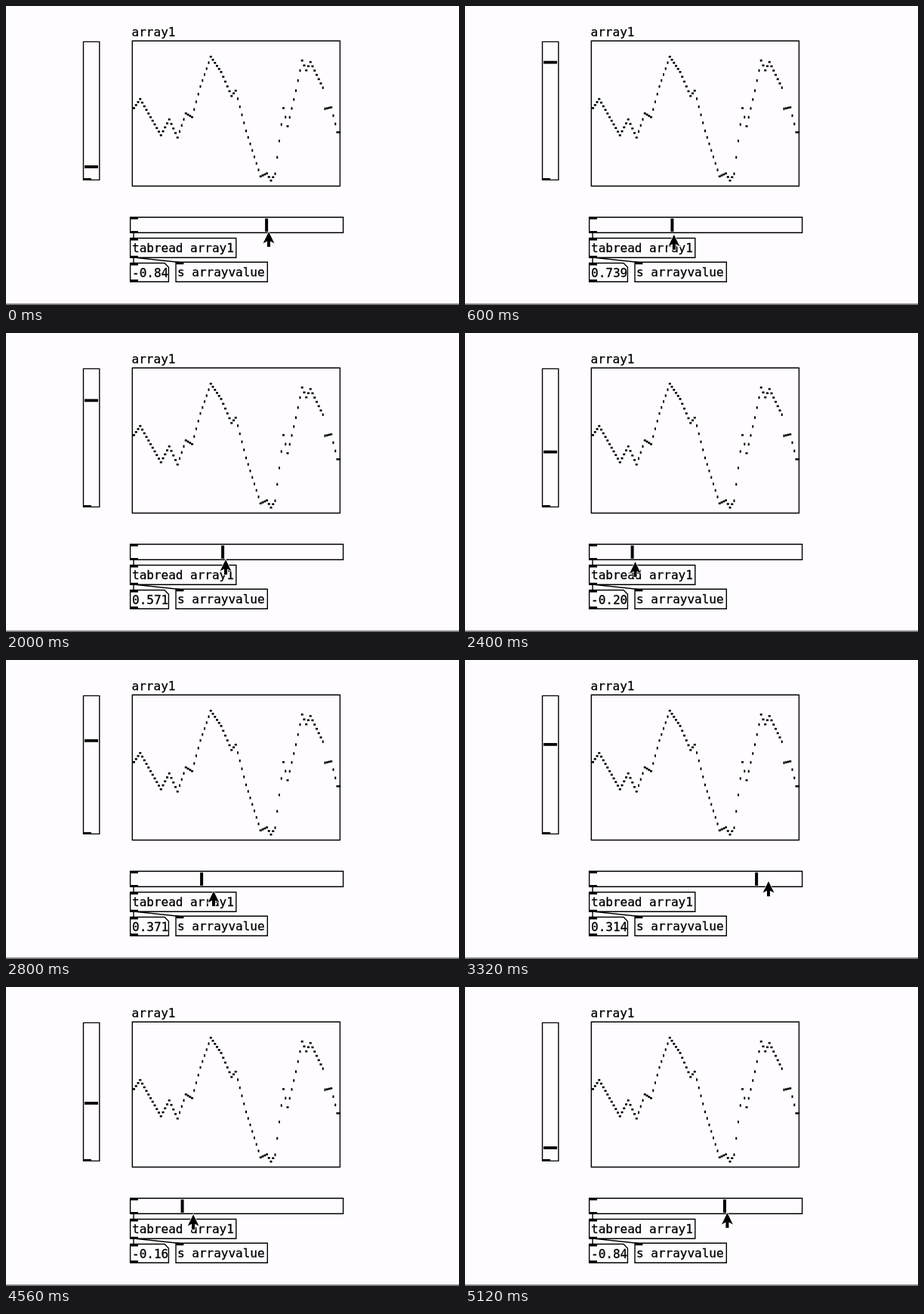
Animation, 600 px wide and 396 px high, one loop 5.16 s. Source, as an HTML page with a canvas:

```html
<!DOCTYPE html>
<html lang="en">
<head>
<meta charset="utf-8">
<title>array1</title>
<style>
  html, body { margin: 0; width: 100%; height: 100%; overflow: hidden; background: #fefcff; }
  canvas { display: block; }
</style>
</head>
<body>
<canvas id="stage" width="600" height="396"></canvas>
<script>
const ctx = document.getElementById("stage").getContext("2d");
const LOOP = 5160;
const TICK = 40;
const SIZE = 100;
const INK = "#000";
const PAPER = "#fefcff";

// Corners of the stored wave: sample index, stage y.
const corners = [
  [0, 135], [3, 123], [13, 171], [17, 150], [21, 174], [25, 142], [28, 147],
  [32, 106.4], [37, 67], [42, 87.2], [47, 119], [49, 112], [54, 165.2],
  [61, 225.5], [64, 221.5], [66, 231], [68, 222], [72, 135], [74, 159],
  [78, 111.9], [81, 72], [83, 85], [85, 74], [91, 108], [92, 136], [95, 134],
  [98, 167], [99, 167]
];

// Gesture: time, pointer x, pointer tip y, slider x
const gesture = [
  [0, 348, 299, 345],
  [680, 274, 303, 271.5],
  [840, 274, 303, 271.5],
  [1280, 332, 307, 320.2],
  [1480, 343, 303, 339],
  [2000, 291, 300, 287],
  [2500, 220, 304, 216],
  [2800, 275, 306, 259],
  [3320, 402, 293, 386],
  [3620, 437, 292, 433],
  [4040, 307.4, 293.5, 338],
  [4400, 215, 300, 212],
  [4760, 308, 302, 280]
];

function sampleY(i) {
  const k = Math.max(1, corners.findIndex(([index]) => index >= i));
  const [i0, y0] = corners[k - 1];
  const [i1, y1] = corners[k];
  return y0 + (y1 - y0) * (i - i0) / (i1 - i0);
}

const samples = Array.from({ length: SIZE }, (_, i) => sampleY(i));

function keyAt(i) {
  const n = gesture.length;
  const turn = Math.floor(i / n);
  const [time, ...rest] = gesture[i - turn * n];
  return [time + turn * LOOP, ...rest];
}

function slope(i, col) {
  const [a, b, c] = [keyAt(i - 1), keyAt(i), keyAt(i + 1)];
  const before = (b[col] - a[col]) / (b[0] - a[0]);
  const after = (c[col] - b[col]) / (c[0] - b[0]);
  return before * after > 0 ? 2 * before * after / (before + after) : 0;
}

// Smooth periodic curve that never overshoots its keys.
function track(t, col) {
  let i = gesture.length - 1;
  while (gesture[i][0] > t) i--;
  const a = keyAt(i), b = keyAt(i + 1);
  const span = b[0] - a[0];
  const u = (t - a[0]) / span;
  const ease = u * u * (3 - 2 * u);
  return a[col] + (b[col] - a[col]) * ease
    + span * u * (1 - u) * ((1 - u) * slope(i, col) - u * slope(i + 1, col));
}

function readArray(sliderX) {
  const i = Math.floor((sliderX - 168.5) / 2.76);
  return (142 - samples[Math.max(0, Math.min(SIZE - 1, i))]) / 96;
}

function fill(x, y, w, h, color = INK) {
  ctx.fillStyle = color;
  ctx.fillRect(x, y, w, h);
}

function line(points, closed) {
  ctx.beginPath();
  points.forEach(([x, y]) => ctx.lineTo(x, y));
  if (closed) ctx.closePath();
  ctx.strokeStyle = INK;
  ctx.lineWidth = 1.4;
  ctx.stroke();
}

function box(l, t, r, b) {
  line([[l, t], [r, t], [r, b], [l, b]], true);
}

function text(str, x, y) {
  ctx.fillStyle = ctx.strokeStyle = INK;
  ctx.lineWidth = 0.3;
  ctx.font = '16px "DejaVu Sans Mono", monospace';
  ctx.fillText(str, x, y);
  ctx.strokeText(str, x, y);
}

function port(x, y) {
  fill(x, y, 10, 3);
}

function drawArray() {
  text("array1", 166.6, 40.4);
  box(167.3, 46.2, 442.4, 238.5);
  samples.forEach((y, i) => {
    const x = 168 + i * 2.75;
    const rise = Math.abs((samples[i + 1] ?? y) - (samples[i - 1] ?? y));
    if (rise > 14) fill(x + 0.5, y - 1.5, 2, 3.4);
    else fill(x, y - 1.1, 3, 2.6);
  });
}

function drawPatch() {
  box(102.5, 47.4, 123.8, 230.4);
  port(103, 228);

  box(164.6, 279.8, 446.6, 300.3);
  port(165, 279.5);
  port(165, 298);

  box(164.6, 307.5, 304.8, 333.3);
  port(165, 307.5);
  port(165, 330.8);
  text("tabread array1", 167, 326.3);

  line([[164.6, 340.5], [210, 340.5], [215.4, 346], [215.4, 365.2], [164.6, 365.2]], true);
  port(165, 340.5);
  port(165, 362.3);

  box(225, 339.2, 346.3, 365.2);
  port(225.4, 339.2);
  text("s arrayvalue", 227, 358.3);

  line([[169, 300], [169, 308]]);
  line([[169, 333], [169, 341]]);
  line([[169, 333], [230, 339.5]]);

  fill(0, 394, 600, 2, "#7d7b7e");
}

function drawPointer(x, y) {
  const half = [[0, 0], [7.4, 15.3], [2, 12.5], [2, 20]];
  const mirrored = half.slice(1).reverse().map(([dx, dy]) => [-dx, dy]);
  ctx.beginPath();
  [...half, ...mirrored].forEach(([dx, dy]) => ctx.lineTo(x + dx, y + dy));
  ctx.closePath();
  ctx.strokeStyle = PAPER;
  ctx.lineWidth = 1.5;
  ctx.stroke();
  ctx.fillStyle = INK;
  ctx.fill();
}

function draw(now) {
  const t = Math.floor((now % LOOP) / TICK) * TICK;
  const sliderX = track(t, 3);
  const value = readArray(sliderX);

  fill(0, 0, 600, 396, PAPER);
  drawArray();
  drawPatch();
  fill(104, 137.4 - value * 87.5, 18, 3.8);
  fill(sliderX - 1.9, 281.5, 4, 17.3);
  text(value.toFixed(3).slice(0, 5), 167, 359.3);
  drawPointer(track(t, 1), track(t, 2));
}

const start = performance.now();
function loop() {
  draw(performance.now() - start);
  requestAnimationFrame(loop);
}
loop();
</script>
</body>
</html>
```
